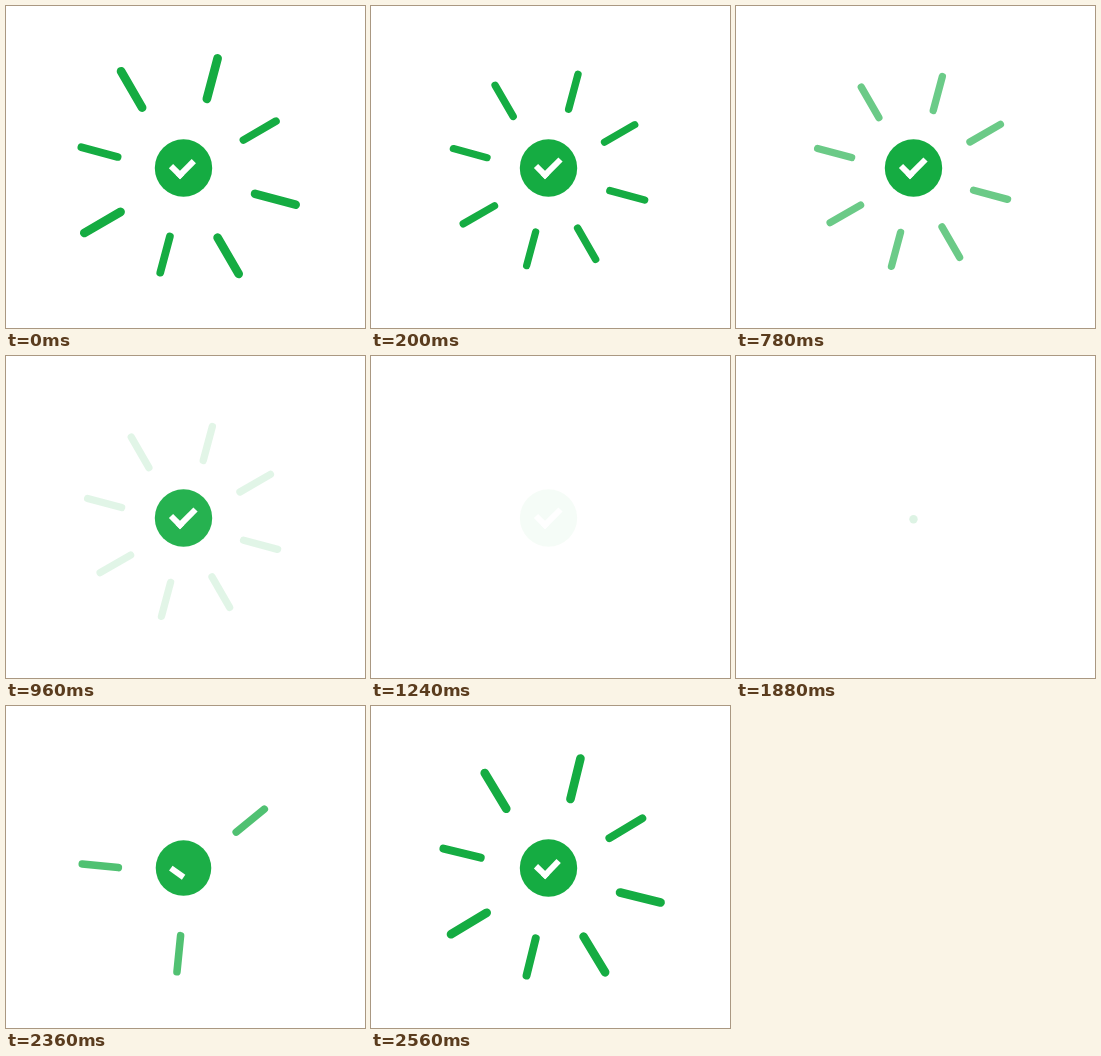
Animation, 359 px wide and 322 px high, one loop 2.6 s. Source, as an HTML page with a canvas:

```html
<!DOCTYPE html>
<html lang="en">
<head>
<meta charset="utf-8">
<title>Success check</title>
<style>
  html, body { margin: 0; width: 100%; height: 100%; overflow: hidden; background: #fff; }
  canvas { display: block; }
</style>
</head>
<body>
<canvas id="stage" width="359" height="322"></canvas>
<script>
const ctx = document.getElementById('stage').getContext('2d');
const LOOP = 2600, START = 1880, GREEN = '#15ac42', RAD = Math.PI / 180;

// Ray scale by age in ms: pop, overshoot, settle
const POP = [[0, 1], [40, 1.03], [80, 1.108], [125, 1.183], [155, 1.192], [170, 1.188],
  [240, 1.092], [280, 1.065], [400, 1.01], [605, 0.98], [700, 1], [760, 1]];

const clamp = v => Math.max(0, Math.min(1, v));
const smooth = (t, from, to) => {
  const p = clamp((t - from) / (to - from));
  return p * p * (3 - 2 * p);
};

// Cubic interpolation through [time, value] keys
function curve(keys, t) {
  const last = keys.length - 1;
  if (t >= keys[last][0]) return keys[last][1];
  const i = keys.findIndex(k => k[0] > t) - 1;
  const slope = j => {
    const a = keys[Math.max(0, j - 1)], b = keys[Math.min(last, j + 1)];
    return (b[1] - a[1]) / (b[0] - a[0]);
  };
  const [t0, v0] = keys[i], [t1, v1] = keys[i + 1];
  const d = t1 - t0, p = (t - t0) / d, q = 1 - p;
  return v0 * q * q * (1 + 2 * p) + v1 * p * p * (3 - 2 * p)
    + d * p * q * (slope(i) * q - slope(i + 1) * p);
}

function line(x1, y1, x2, y2) {
  ctx.beginPath();
  ctx.moveTo(x1, y1);
  ctx.lineTo(x2, y2);
  ctx.stroke();
}

function drawRays(t, turn) {
  const fade = 1 - smooth(t, 3180, 3670);
  ctx.strokeStyle = GREEN;
  ctx.lineCap = 'round';
  for (let i = 0; i < 8; i++) {
    const early = i === 1 || i === 4 || i === 6;
    const age = t - (early ? 2320 : 2435);
    if (age <= 0) continue;
    const scale = curve(POP, age);
    const angle = -75 + 45 * i + turn;
    const place = (angle + (i < 4 ? 2.5 : -2.5)) * RAD;
    ctx.save();
    ctx.globalAlpha = clamp(age / 55) * fade;
    ctx.translate(177.5, 164.5);
    ctx.scale(scale, scale);
    ctx.translate(80.8 * Math.cos(place), 80.8 * Math.sin(place));
    ctx.rotate(angle * RAD);
    ctx.lineWidth = 7.3;
    line(-17.6, 0, 17.6, 0);
    ctx.restore();
  }
}

function drawBadge(t, turn) {
  const grow = 1 - (1 - clamp((t - 1832) / 645)) ** 2;
  ctx.save();
  ctx.globalAlpha = Math.max(0.04, grow * (1 - smooth(t, 3500, 3870)));
  ctx.translate(177.5, 162 + 1.5 * (1 - grow));
  ctx.fillStyle = GREEN;
  ctx.beginPath();
  ctx.arc(0, 0, 28.7 * grow, 0, 7);
  ctx.fill();

  ctx.globalAlpha = 1;
  ctx.rotate(turn * RAD);
  ctx.strokeStyle = '#fff';
  ctx.lineCap = 'butt';
  ctx.lineWidth = 6;
  const short = 11.1 * smooth(t, 2270, 2360);
  const long = 13.8 * smooth(t, 2370, 2540) + 1.7 * smooth(t, 2580, 2800);
  if (short) line(-12.5, -2, -12.5 + short, -2 + short);
  if (long) line(-5.6, 9.1, -3.5 + long, 7 - long);
  ctx.restore();
}

function draw(now) {
  const time = now % LOOP;
  const t = time < START ? time + LOOP : time;
  const turn = -9.3 * (1 - smooth(t, 2350, 2620));
  ctx.fillStyle = '#fff';
  ctx.fillRect(0, 0, 359, 322);
  drawRays(t, turn);
  drawBadge(t, turn);
}

const begin = performance.now();
function tick() {
  draw(performance.now() - begin);
  requestAnimationFrame(tick);
}
tick();
</script>
</body>
</html>
```
